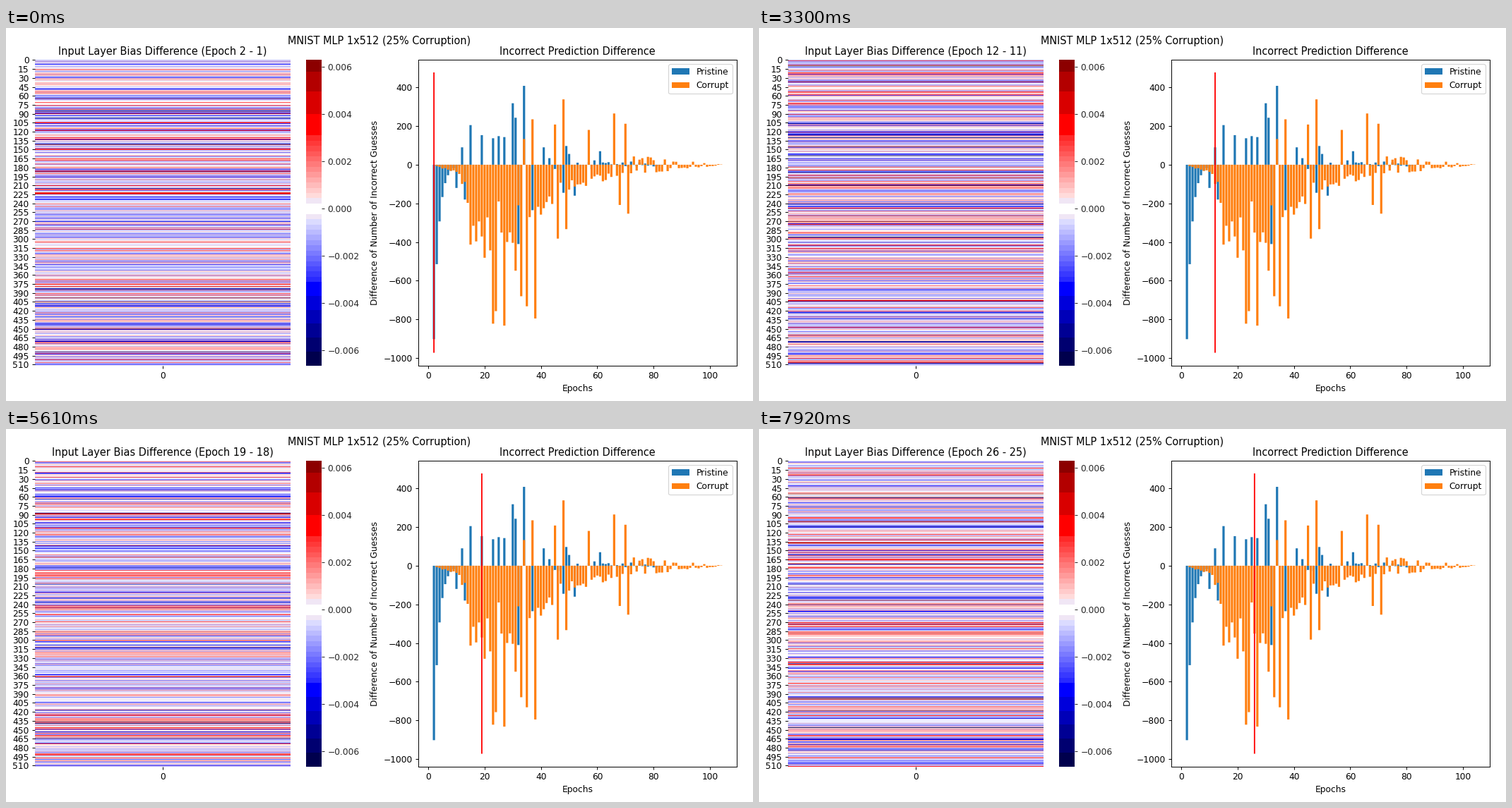
Write a matplotlib script that moves like this. It is 1058 px wide and 529 px high and loops after 8 s.

```python
import numpy as np
import matplotlib.pyplot as plt
from matplotlib.animation import FuncAnimation
from matplotlib.colors import BoundaryNorm, ListedColormap

W, H, DPI = 1058, 529, 92
STEP, HOLD, LOOP = 40, 330, 8000   # ms
FIRST_EPOCH = 2
ROWS = 512
LOW, HIGH = -0.00663, 0.0063       # range of the colour bar
PT = W / 12 / DPI                  # keeps the type sized for a 12 inch wide figure

plt.rcParams.update({
    "font.family": "DejaVu Sans",
    "font.size": 10 * PT,
    "axes.titlesize": 11.85 * PT,
    "figure.titlesize": 11.85 * PT,
    "axes.titlepad": 6 * PT,
    "axes.labelpad": 4 * PT,
    "axes.linewidth": 0.8 * PT,
    "lines.linewidth": 1.5 * PT,
    "patch.linewidth": 1.0 * PT,
})
for axis in ("xtick", "ytick"):
    plt.rcParams.update({
        f"{axis}.major.size": 3.5 * PT,
        f"{axis}.major.pad": 3.5 * PT,
        f"{axis}.major.width": 0.8 * PT,
    })

# Tallest bars; the rest follow an envelope with seeded jitter
PRISTINE_SPIKES = {
    10: -120, 12: 90, 13: -180, 15: 205, 19: 153, 23: 137, 25: 148, 27: 143, 30: 318,
    31: 243, 32: -410, 34: 408, 37: -235, 41: 90, 48: -145, 49: 97, 52: -160, 61: 70,
}
CORRUPT_SPIKES = {
    15: -413, 23: -822, 24: -757, 25: -190, 27: -832, 32: -210, 33: -680, 34: 133,
    35: -732, 37: 235, 38: -795, 45: 208, 46: -382, 48: 338, 49: -333, 57: 180,
    66: 265, 68: -208, 70: 212, 71: -253,
}


def with_spikes(epochs, heights, spikes):
    heights[np.array(list(spikes)) - epochs[0]] = list(spikes.values())
    return epochs, heights


def pristine():
    """A steep early recovery, then small changes that fade out."""
    rng = np.random.default_rng(4)
    epochs = np.arange(2, 85)
    recovery = -902 * 0.57 ** (epochs - 2.0)
    fading = rng.normal(0, 40, epochs.size) * np.exp(-(epochs - 43) / 18)
    heights = np.where(epochs < 43, recovery, fading)
    return with_spikes(epochs, heights, PRISTINE_SPIKES)


def corrupt():
    """A deep, long drop that later swings both ways and dies out."""
    rng = np.random.default_rng(7)
    epochs = np.arange(3, 105)
    depth = np.interp(epochs, [3, 11, 14, 18, 30, 38, 50, 72, 88, 104],
                      [8, 45, 170, 430, 500, 250, 110, 45, 25, 2])
    rises = (epochs > 72) & (rng.random(epochs.size) > 0.6)
    heights = depth * rng.uniform(0.6, 1.2, epochs.size) * np.where(rises, 1, -1)
    return with_spikes(epochs, heights, CORRUPT_SPIKES)


def bias_map():
    """Stepped blue-white-red colours: fine steps near zero, coarse at the ends."""
    n = 13
    fine = np.linspace(0.00022, 0.0031, n + 1)
    dark_blue = np.linspace(LOW, -fine[-1], 7)[:-1]
    dark_red = [0.0040, 0.00495, 0.00579, HIGH]
    edges = np.r_[dark_blue, -fine[::-1], fine, dark_red]
    pale = np.linspace(0.16, 0.86, n - 1)
    lavender = (0.94, 0.90, 0.96)
    colors = [(0, 0, b) for b in np.linspace(0.3, 1, 6)]
    colors += [(w, w, 1) for w in pale] + [lavender, (1, 1, 1), lavender]
    colors += [(1, w, w) for w in pale[::-1]]
    colors += [(r, 0, 0) for r in np.linspace(1, 0.55, 4)]
    return edges, ListedColormap(colors)


def bias_change(epoch):
    rng = np.random.default_rng(epoch)
    rows = rng.laplace(-0.0002, 0.0013, (ROWS, 1))
    return np.clip(rows, LOW * 0.99, HIGH * 0.99)


def add_axes(left, right, top=45, bottom=478.6):
    return fig.add_axes([left / W, 1 - bottom / H, (right - left) / W, (bottom - top) / H])


fig = plt.figure(figsize=(W / DPI, H / DPI), dpi=DPI, facecolor="white")
fig.suptitle("MNIST MLP 1x512 (25% Corruption)")
edges, cmap = bias_map()
norm = BoundaryNorm(edges, cmap.N)

heat_ax = add_axes(41.3, 403)
heat = heat_ax.imshow(bias_change(FIRST_EPOCH), cmap=cmap, norm=norm, aspect="auto",
                      interpolation="hanning", interpolation_stage="rgba",
                      extent=(0, 1, ROWS, 0))
marks = np.arange(0, ROWS, 15)
heat_ax.set_yticks(marks + 0.5, [str(m) for m in marks])
heat_ax.set_xticks([0.5], ["0"])
heat_ax.spines[:].set_visible(False)
title = heat_ax.set_title("")

scale_ax = add_axes(425.2, 446.9)
scale_ax.pcolormesh([0, 1], edges, (edges[:-1] + edges[1:])[:, None] / 2, cmap=cmap, norm=norm)
scale_ax.set_ylim(LOW, HIGH)
scale_ax.set_xticks([])
scale_ax.set_yticks(np.arange(-3, 4) * 0.002)
scale_ax.yaxis.tick_right()
scale_ax.tick_params(colors="0.15")
scale_ax.spines[:].set_visible(False)

count_ax = add_axes(584, 1035)
for (epochs, heights), name in ((pristine(), "Pristine"), (corrupt(), "Corrupt")):
    # Without snapping the thin gaps between bars stay even
    count_ax.bar(epochs, heights, label=name, snap=False)
marker, = count_ax.plot([FIRST_EPOCH] * 2, [-969, 474], color="red", zorder=3, snap=False)
count_ax.set_xlim(-3.54, 109.54)
count_ax.set_ylim(-1038, 543)
count_ax.set_title("Incorrect Prediction Difference")
count_ax.set_xlabel("Epochs")
count_ax.set_ylabel("Difference of Number of Incorrect Guesses")
count_ax.legend(loc="upper right")


def update(i):
    # A change that falls inside a step shows from the start of that step
    epoch = FIRST_EPOCH + (i * STEP + STEP - 1) // HOLD
    heat.set_data(bias_change(epoch))
    title.set_text(f"Input Layer Bias Difference (Epoch {epoch} - {epoch - 1})")
    marker.set_xdata([epoch, epoch])
    return heat, title, marker


anim = FuncAnimation(fig, update, frames=LOOP // STEP, interval=STEP,
                     repeat=True, repeat_delay=0)
plt.show()
```
